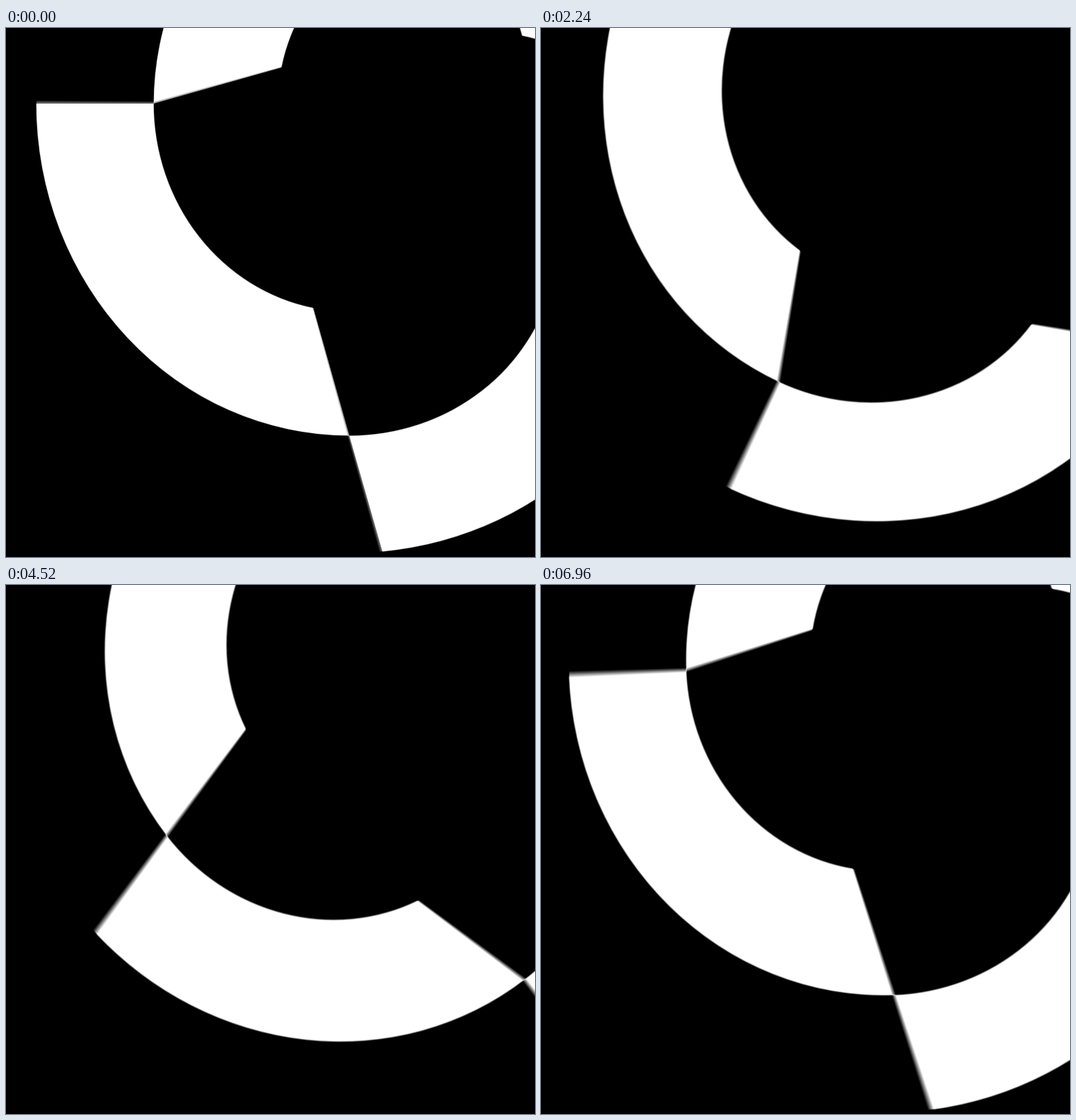
An HTML page with a canvas that plays this animation: 748 px wide and 748 px high, repeating every 7 s.

```html
<!DOCTYPE html>
<html lang="en">
<head>
<meta charset="utf-8">
<title>Spinning ring segments</title>
<style>
  html, body { margin: 0; width: 100%; height: 100%; overflow: hidden; background: #000; }
  canvas { display: block; width: 748px; height: 748px; }
</style>
</head>
<body>
<canvas id="stage" width="748" height="748"></canvas>
<script>
const SIZE = 748;
const HUB = [582, 203.3];
const LOOP = 7000;
const STEP = 40;
const STEPS = LOOP / STEP;
const SHUTTER = 0.5; // exposure as a share of one step
const SAMPLES = 15;

const OFFSET = -96.4; // centre of a band's ellipses, from the hub on both axes
const OUTER = { rx: 443, ry: 469.7 };
const INNER = { rx: 277, ry: 294.2 };

const ctx = document.getElementById('stage').getContext('2d');
const rad = deg => deg * Math.PI / 180;

// One band: a slice between two concentric ellipses, from the left to the bottom
function band(startAngle) {
  const path = new Path2D();
  path.ellipse(OFFSET, OFFSET, OUTER.rx, OUTER.ry, 0, rad(startAngle), rad(90), true);
  path.ellipse(OFFSET, OFFSET, INNER.rx, INNER.ry, 0, rad(100.6), rad(180));
  path.closePath();
  return path;
}

const bands = [band(180), band(174.28)];

function drawShape(angle) {
  ctx.save();
  ctx.translate(...HUB);
  ctx.rotate(angle);
  for (let i = 0; i < 4; i++) {
    ctx.fill(bands[i % 2]);
    ctx.rotate(Math.PI / 2);
  }
  ctx.restore();
}

function render(time) {
  const step = Math.floor((time % LOOP) / STEP);
  ctx.globalCompositeOperation = 'source-over';
  ctx.fillStyle = '#000';
  ctx.fillRect(0, 0, SIZE, SIZE);

  // Motion blur: add up evenly spaced exposures; nothing moves before the start
  const level = 255 / SAMPLES;
  ctx.globalCompositeOperation = 'lighter';
  ctx.fillStyle = `rgb(${level}, ${level}, ${level})`;
  for (let i = 0; i < SAMPLES; i++) {
    const offset = ((i + 0.5) / SAMPLES - 0.5) * SHUTTER;
    drawShape(Math.max(0, step + offset) / STEPS * 2 * Math.PI);
  }
}

const began = performance.now();
function tick() {
  render(performance.now() - began);
  requestAnimationFrame(tick);
}
tick();
</script>
</body>
</html>
```
